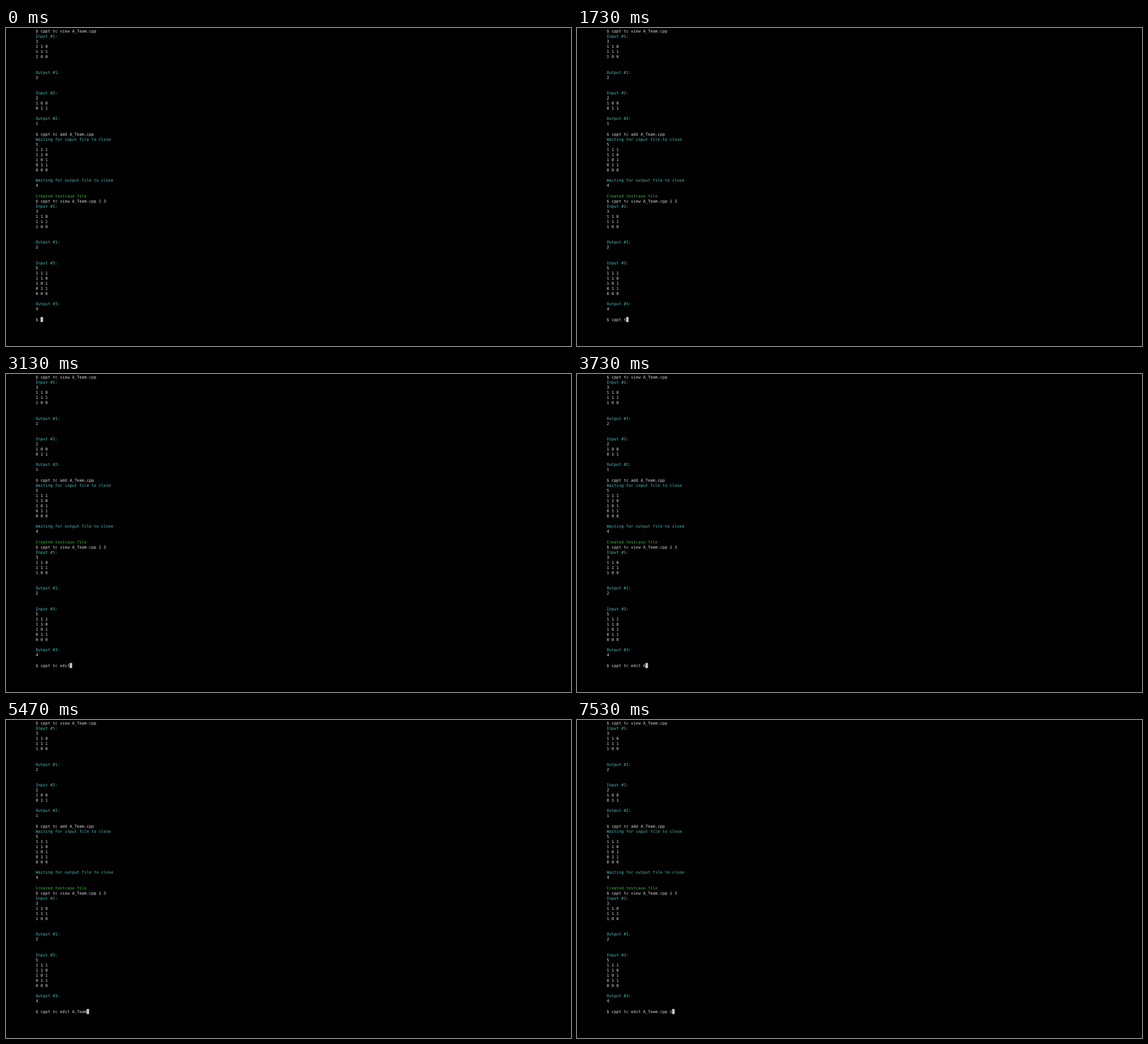
Recreate the animation shown at these times as an HTML page. Size 998x561 px, loop 8000 ms.

```html
<!DOCTYPE html>
<html lang="en">
<head>
<meta charset="utf-8">
<title>Terminal</title>
<style>
  html, body { margin: 0; width: 100%; height: 100%; overflow: hidden; background: #000; }
  svg { display: block; width: 998px; height: 561px; }
  text {
    font: 7.11px "DejaVu Sans Mono", monospace;
    white-space: pre;
    text-rendering: geometricPrecision;
    fill: #dcdcdc;
  }
  .info { fill: #44c4c0; }
  .done { fill: #34be34; }
</style>
</head>
<body>
<svg viewBox="0 0 998 561"><rect id="cursor" y="509.8" width="4.4" height="9" fill="#c7c7c7"/></svg>
<script>
const LEFT = 52.5, BASELINE = 7.87, CHAR = 4.28, LINE = 9.085, LOOP = 8000;

const first = "3\n1 1 0\n1 1 1\n1 0 0\n\n";
const second = "2\n1 0 0\n0 1 1\n";
const third = "5\n1 1 1\n1 1 0\n1 0 1\n0 1 1\n0 0 0\n";
const view = (id, input, output) => `Input #${id}:\n${input}\nOutput #${id}:\n${output}\n`;

const screen = `$ cppt tc view A_Team.cpp
${view(1, first, "2\n\n")}${view(2, second, "1\n")}$ cppt tc add A_Team.cpp
Waiting for input file to close
${third}
Waiting for output file to close
4

Created testcase file
$ cppt tc view A_Team.cpp 1 3
${view(1, first, "2\n\n")}${view(3, third, "4\n")}$ `;

// Typing comes in bursts with an even gap (ms) between keys
const bursts = [
  { keys: "c", start: 470 },
  { keys: "ppt ", start: 800, gap: 175 },
  { keys: "t", start: 1730 },
  { keys: "c e", start: 2200, gap: 200 },
  { keys: "dit ", start: 2870, gap: 110 },
  { keys: "A", start: 3730 },
  { keys: "_Team", start: 4470, gap: 250 },
  { keys: ".cpp ", start: 6330, gap: 167 },
  { keys: "1", start: 7530 },
];

const svg = document.querySelector("svg");
const cursor = document.getElementById("cursor");

function addLine(content, row) {
  const line = document.createElementNS(svg.namespaceURI, "text");
  line.setAttribute("x", LEFT);
  line.setAttribute("y", BASELINE + row * LINE);
  if (/^(Input|Output|Waiting)/.test(content)) line.setAttribute("class", "info");
  if (content.startsWith("Created")) line.setAttribute("class", "done");
  line.textContent = content;
  svg.append(line);
  return line;
}

function typedBy(time) {
  return bursts.map(({ keys, start, gap = 1 }) =>
    keys.slice(0, Math.max(0, Math.floor((time - start) / gap) + 1))).join("");
}

const prompt = screen.split("\n").map(addLine).pop();

function draw() {
  const content = "$ " + typedBy(performance.now() % LOOP);
  prompt.textContent = content;
  cursor.setAttribute("x", LEFT + content.length * CHAR);
  requestAnimationFrame(draw);
}
draw();
</script>
</body>
</html>
```
